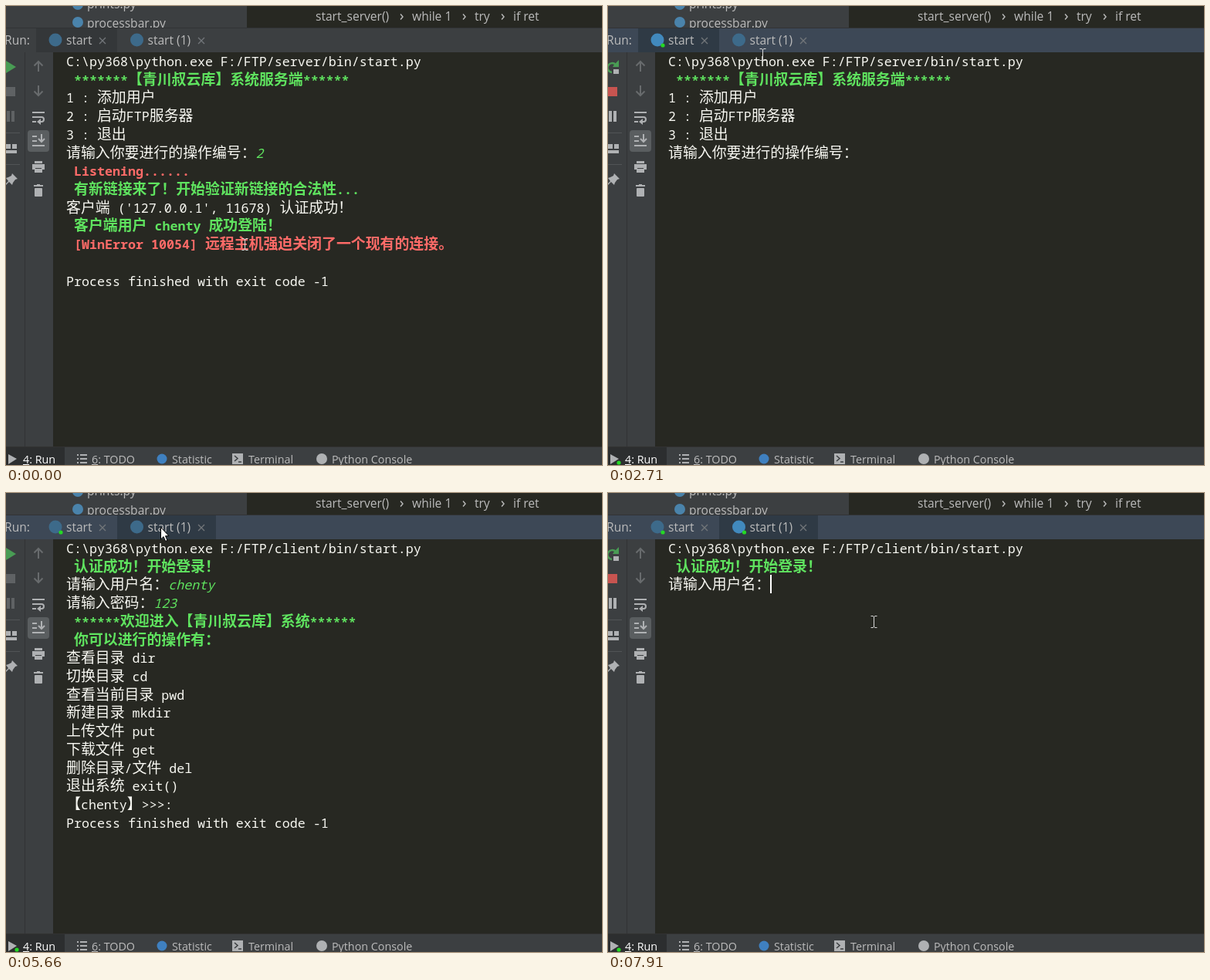
Write an HTML page with a canvas that moves like this. It is 772 px wide and 595 px high and loops after 8 s.

```html
<!DOCTYPE html>
<html lang="zh-CN">
<head>
<meta charset="utf-8">
<title>Run console</title>
<style>
html, body { margin: 0; width: 100%; height: 100%; overflow: hidden; background: #272822; }
canvas { display: block; }
</style>
</head>
<body>
<canvas id="stage" width="772" height="595"></canvas>
<script>
const ctx = document.getElementById('stage').getContext('2d');
const LOOP = 8000, LEFT = 78, TOP = 58.6, LINE = 23.72;
const UI = '"Open Sans", "Noto Sans", sans-serif';
const MONO = '16.67px "Noto Sans Mono", "DejaVu Sans Mono", monospace';
const CJK = '18.9px "Noto Sans CJK SC", "Noto Sans CJK JP", sans-serif';
const PANEL = '#3c3f41', DARK = '#272822', ICON = '#afb1b3', DIM = '#5f6264';
const GREEN = '#5fe35f', RED = '#ff6b68', WHITE = '#f8f8f2', PLAY = '#499c54';

// A leading # is bold green, a leading ! bold red; text after _ is typed input.
const server = [
  'C:\\py368\\python.exe F:/FTP/server/bin/start.py',
  '# *******【青川叔云库】系统服务端******',
  '1 : 添加用户',
  '2 : 启动FTP服务器',
  '3 : 退出',
  '请输入你要进行的操作编号：_2',
  '! Listening......',
  '# 有新链接来了！开始验证新链接的合法性...',
  "客户端 ('127.0.0.1', 11678) 认证成功！",
  '# 客户端用户 chenty 成功登陆！',
  '! [WinError 10054] 远程主机强迫关闭了一个现有的连接。',
  '',
  'Process finished with exit code -1'
];
const client = [
  'C:\\py368\\python.exe F:/FTP/client/bin/start.py',
  '# 认证成功！开始登录！',
  '请输入用户名：_chenty',
  '请输入密码：_123',
  '# ******欢迎进入【青川叔云库】系统******',
  '# 你可以进行的操作有：',
  '查看目录 dir',
  '切换目录 cd',
  '查看当前目录 pwd',
  '新建目录 mkdir',
  '上传文件 put',
  '下载文件 get',
  '删除目录/文件 del',
  '退出系统 exit()',
  '【chenty】>>>:',
  'Process finished with exit code -1'
];

// Start time, lines, number of lines shown, whether the last typed input is shown.
const screens = [
  [0, server, 13, true], [1710, server, 0], [1790, server, 1], [2090, server, 6],
  [3720, server, 6, true], [4270, server, 7, true],
  [5660, client, 16, true], [7040, client, 1], [7290, client, 3]
];
// Caret: from, to, x, line.
const carets = [
  [1480, 1710, 78, 13], [3320, 3720, 323, 5], [3720, 4040, 333, 5], [4040, 4270, 78, 6],
  [4270, 4800, 78, 7], [5280, 5660, 78, 7], [7910, 8000, 210, 2]
];
// Pointer moves: first step, last step, step count, end x, end y.
const moves = [
  [210, 280, 2, 193, 224], [510, 1160, 9, 7, 70],
  [2090, 2630, 8, 150, 41], [2710, 2710, 1, 200, 63], [2790, 2860, 2, 276, 167],
  [2950, 3090, 3, 367, 201], [4800, 4800, 1, 305, 145], [4880, 5120, 4, 200, 44],
  [5970, 6430, 7, 3, 78], [7450, 7680, 4, 344, 167]
];

function rect(color, x, y, w, h, r = 0) {
  ctx.fillStyle = color;
  ctx.beginPath();
  ctx.roundRect(x, y, w, h, r);
  ctx.fill();
}
function dot(color, x, y, r) {
  ctx.fillStyle = color;
  ctx.beginPath();
  ctx.arc(x, y, r, 0, 7);
  ctx.fill();
}
function fill(color, d) {
  ctx.fillStyle = color;
  ctx.fill(new Path2D(d));
}
function stroke(color, d, width = 2) {
  ctx.strokeStyle = color;
  ctx.lineWidth = width;
  ctx.stroke(new Path2D(d));
}
function label(s, x, y, color = '#bbbbbb', size = 15.6) {
  ctx.font = `${size}px ${UI}`;
  ctx.fillStyle = color;
  ctx.fillText(s, x, y);
}

function run(s, style, color, x, y) {
  ctx.fillStyle = color;
  for (const part of s.split(/([^\x00-\xff]+)/)) {
    if (!part) continue;
    ctx.font = style + ' ' + (part.charCodeAt(0) > 255 ? CJK : MONO);
    ctx.fillText(part, x, y);
    x += ctx.measureText(part).width;
  }
  return x;
}
function consoleLine(s, i, withInput) {
  const y = TOP + LINE * i + 19.4;
  const color = { '#': GREEN, '!': RED }[s[0]];
  const [text, input] = (color ? s.slice(1) : s).split('_');
  const x = run(text, color ? 'bold' : 'normal', color || WHITE, LEFT, y);
  if (input && withInput) run(input, 'italic', GREEN, x, y);
}
function drawConsole(t) {
  rect(DARK, 61, 60, 711, 512);
  const [, lines, count, typed] = screens.findLast(s => t >= s[0]);
  lines.slice(0, count).forEach((s, i) => consoleLine(s, i, typed));
  for (const [from, to, x, line] of carets)
    if (t >= from && t < to) rect('#ffffff', x, Math.round(TOP + LINE * line), 2, 24);
}

function drawTop() {
  rect(PANEL, 0, 0, 312, 28);
  rect(DARK, 312, 0, 460, 28);
  dot('#4a83ab', 93, -2, 7);
  dot('#4a83ab', 93, 21, 7);
  label('prints.py', 105, 3);
  label('processbar.py', 105, 28);
  [['start_server()', 401], ['while 1', 526], ['try', 607], ['if ret', 657]]
    .forEach(([s, x]) => label(s, x, 19));
  for (const x of [511, 592, 642]) stroke('#bbbbbb', `M${x} 10.5l3 3.5-3 3.5`, 1.4);
}

function drawTabs(focused, second, serverOn, clientOn) {
  rect('#313335', 0, 28, 772, 1);
  rect(focused ? '#3d4856' : PANEL, 0, 29, 772, 31);
  rect(focused ? '#2f3a45' : '#343739', second ? 144 : 39, 29, second ? 128 : 105, 31);
  label('Run:', -2, 50);
  const tab = (name, x, closeX, on, selected) => {
    dot(on && selected ? '#4189bd' : '#3d6a8a', x, 44, 8.5);
    if (on) dot('#25d825', x + 7, 51, 2.6);
    label(name, x + 14, 50);
    stroke('#72767a', `M${closeX - 4} 41l8 8m0-8l-8 8`, 1.3);
  };
  tab('start', 64, 125, serverOn, !second);
  tab('start (1)', 169.5, 253, clientOn, second);
}

function drawToolbars(on, hover, pressed) {
  rect(PANEL, 0, 60, 61, 512);
  rect('#313335', 24, 60, 1, 512);
  if (hover) rect(pressed ? '#5f6466' : '#4d5154', -4, 65, 24, 27, 3);
  if (on) {
    stroke(PLAY, 'M10 76A6 6 0 1 0 5 86', 2.4);
    fill(PLAY, 'M8 76L14 70V79H6z');
    rect(ICON, 7, 82, 7, 6);
  } else fill(PLAY, 'M0 71L13 79L0 87z');
  rect(on ? '#c75450' : DIM, 0, 105, 12, 12);
  rect(on ? ICON : DIM, 1, 136, 4, 14);
  rect(on ? ICON : DIM, 7, 136, 4, 14);
  rect('#515456', 0, 164, 18, 1);
  rect('#515456', 0, 205, 18, 1);
  rect(ICON, 0, 179, 6, 6);
  rect(ICON, 8, 179, 6, 6);
  rect(ICON, 0, 187, 14, 4);
  fill(ICON, 'M8 217L15 224L12 225L9 229L8 232L4 228L0 232L-1 231L3 227L0 223L3 222L7 220z');

  stroke('#686b6d', 'M42 85V72M36.5 77.5L42 72L47.5 77.5');
  stroke('#686b6d', 'M42 103V116M36.5 110.5L42 116L47.5 110.5');
  stroke(ICON, 'M34 138H50M34 144H46A3 3 0 0 1 46 150H43M34 150H39');
  fill(ICON, 'M40 150L45 146V154z');
  rect('#5a5e60', 28, 161, 28, 28, 4);
  stroke(ICON, 'M34 169H40M34 175H40M34 181H50M46 166V176M42 172L46 176L50 172');
  rect(ICON, 37, 201, 10, 3);
  rect(ICON, 34, 205, 16, 7);
  rect(ICON, 37, 210, 10, 6);
  rect(PANEL, 38, 210, 8, 1);
  rect(ICON, 36, 232, 12, 2);
  rect(ICON, 40, 231, 4, 2);
  rect(ICON, 37, 236, 10, 11, 1);
}

function drawBottom(on) {
  rect('#323232', 0, 571, 772, 1);
  rect(PANEL, 0, 572, 772, 23);
  rect('#2c2e2f', 0, 572, 76, 23);
  fill(ICON, 'M3 581L14 587L3 594z');
  if (on) dot('#25d825', 14, 592, 2.6);
  const item = (s, x, color) => label(s, x, 593, color, 14.3);
  item('4: Run', 22, '#ffffff');
  rect('#ffffff', 22, 594, 8, 1);
  stroke(ICON, 'M92 582H94M92 587H94M92 592H94M96 582H105M96 587H105M96 592H105');
  item('6: TODO', 111);
  rect('#bbbbbb', 111, 594, 8, 1);
  dot('#3f80c0', 202, 587, 6.5);
  item('Statistic', 215);
  rect(ICON, 293, 580, 14, 14);
  stroke(PANEL, 'M296 583l4 3.5-4 3.5M301 591h4', 1.5);
  item('Terminal', 314);
  dot(ICON, 409, 587, 7);
  item('Python Console', 422);
}

function pointerAt(t) {
  let x = 309, y = 309;
  for (const [from, to, n, endX, endY] of moves) {
    if (t < from) break;
    const gap = (to - from) / Math.max(1, n - 1) || 1;
    const p = Math.min(n, Math.floor((t - from) / gap + 1.001)) / n;
    x += (endX - x) * p;
    y += (endY - y) * p;
  }
  return [Math.round(x), Math.round(y)];
}
function drawPointer(x, y) {
  ctx.save();
  ctx.translate(x, y);
  if (x > 60 && y > 58) {
    stroke('#d8d8d8', 'M-3.5 -7.5H-1L.5 -6.5L2 -7.5H4.5M.5 -6.5V6.5M-3.5 7.5H-1L.5 6.5L2 7.5H4.5', 1);
  } else {
    const arrow = 'M.5 .5V16L4 12.6L6.6 18.5L9 17.4L6.5 11.7H11z';
    fill('#ffffff', arrow);
    stroke('#000000', arrow, 1);
  }
  ctx.restore();
}

function draw(now) {
  const t = now % LOOP;
  const second = t >= 5660, serverOn = t >= 1710, clientOn = t >= 7040;
  const on = second ? clientOn : serverOn;
  const [x, y] = pointerAt(t);
  const hover = !on && x < 20 && y > 64 && y < 92;
  drawTop();
  drawTabs(t >= 1540, second, serverOn, clientOn);
  drawToolbars(on, hover, t >= 6750 && t < 6900);
  drawConsole(t);
  drawBottom(serverOn);
  drawPointer(x, y);
}

const start = performance.now();
function tick() {
  draw(performance.now() - start);
  requestAnimationFrame(tick);
}
tick();
</script>
</body>
</html>
```
